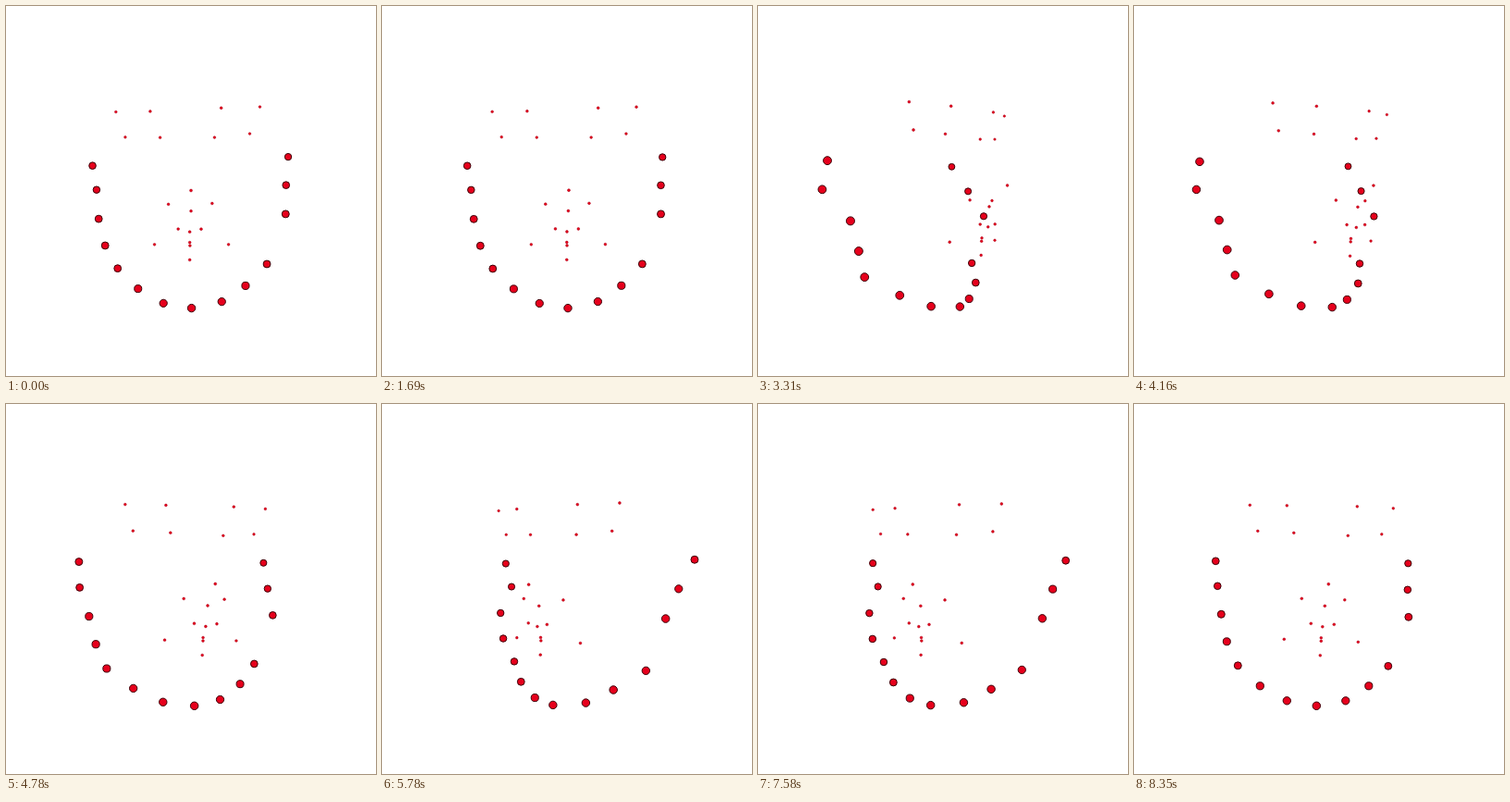
An HTML page with a canvas for the animation above (9.74 s loop, 400 by 400 pixels).

```html
<!DOCTYPE html>
<html lang="en">
<head>
<meta charset="utf-8">
<title>Rotating face landmarks</title>
<style>
html, body { margin: 0; width: 100%; height: 100%; overflow: hidden; background: #fff; }
canvas { display: block; width: 100vw; height: 100vh; }
</style>
</head>
<body>
<canvas id="stage" width="400" height="400"></canvas>
<script>
const ctx = document.getElementById('stage').getContext('2d');
const LOOP = 9740, STEP = 76.5, DIST = 700, MID = 200, RAD = Math.PI / 180;

// Front view: screen x, screen y, depth towards the viewer
const jaw = [
  [88, 169.5, -44], [90, 196.5, -54.5], [94, 227, -20.7], [100, 256.5, -17],
  [112, 282.5, -23], [136, 304.5, -0.5], [165, 320.5, 14], [197, 326, 25],
  [228.5, 320.5, 9.5], [253.5, 304.5, -3.7], [274.5, 283, -31.3],
  [296.5, 230, -31.5], [295.5, 200.5, -59.5], [296, 172, -92.5]
];
const face = [
  [125, 109, 27], [165, 109.5, 45.5], [241, 110.5, 39.6], [280, 112.5, 23],
  [133.5, 137, 24], [172.5, 139, 30.5], [231, 142, 28], [267.5, 140.5, 18],
  [210, 194.5, 82], [181, 210, 55], [227.5, 211.5, 47], [206, 218, 60.5],
  [191, 237, 60], [203.5, 240.5, 60.5], [216, 238, 60],
  [162, 254, 43.5], [242, 257, 38],
  [202, 252.5, 53], [202, 256, 52.5], [201, 271.5, 52.4]
];

// Start and end of each drag
const drags = [[0, 0], [1690, 3296], [3860, 6384], [6950, 8327]];

// Time, yaw in degrees, pitch and roll in radians
const keys = [
  [0, -6.3, 0.05, 0.048],
  [1613, -6.3, 0.05, 0.048],
  [1690, -5.1, 0.048, 0.047],
  [2608, 25, 0.019, 0.028],
  [3296, 45, 0, 0.0155],
  [3783, 45, 0, 0.0155],
  [4778, 10.1, 0, 0.014],
  [5772, -33, 0, 0.0085],
  [6384, -47, 0, 0.006],
  [6873, -47, 0, 0.006],
  [7562, -27, 0, 0.006],
  [7868, -13.5, 0, 0.003],
  [8327, 0, 0, 0],
  [LOOP, 0, 0, 0]
];

function poseAt(time) {
  const [start, end] = drags.findLast(d => d[0] <= time);
  const t = Math.min(end, start + Math.floor((time - start) / STEP) * STEP);
  const i = keys.findIndex(k => k[0] > t);
  const a = keys[i - 1], b = keys[i];
  const u = (t - a[0]) / (b[0] - a[0]);
  return a.map((v, j) => v + (b[j] - v) * u).slice(1);
}

function project([px, py, pz], [yaw, pitch, roll]) {
  const c = Math.cos(yaw * RAD), s = Math.sin(yaw * RAD);
  const flat = 1 - pz / DIST;
  const x0 = (px - MID) * flat, y0 = (py - MID) * flat;
  const x = x0 * c + pz * s, z0 = pz * c - x0 * s;
  const y = y0 + z0 * pitch, z = z0 - y0 * pitch;
  const scale = DIST / (DIST - z);
  return {
    x: MID + (x + y * roll) * scale,
    y: MID + (y - x * roll) * scale,
    z, scale
  };
}

function ball(p, radius, rim, line) {
  ctx.beginPath();
  ctx.arc(p.x + 0.3, p.y + 0.3, radius * p.scale, 0, 2 * Math.PI);
  ctx.fillStyle = '#e6001c';
  ctx.fill();
  ctx.strokeStyle = rim;
  ctx.lineWidth = line;
  ctx.stroke();
}

function draw(now) {
  const pose = poseAt(now % LOOP);
  const place = points => points.map(p => project(p, pose)).sort((a, b) => a.z - b.z);
  ctx.fillStyle = '#fff';
  ctx.fillRect(0, 0, 400, 400);
  place(jaw).forEach(p => ball(p, 4.1, '#3a0008', 1));
  place(face).forEach(p => ball(p, 1.3, '#a80016', 0.5));
}

const begin = performance.now();
function tick() {
  draw(performance.now() - begin);
  requestAnimationFrame(tick);
}
tick();
</script>
</body>
</html>
```
